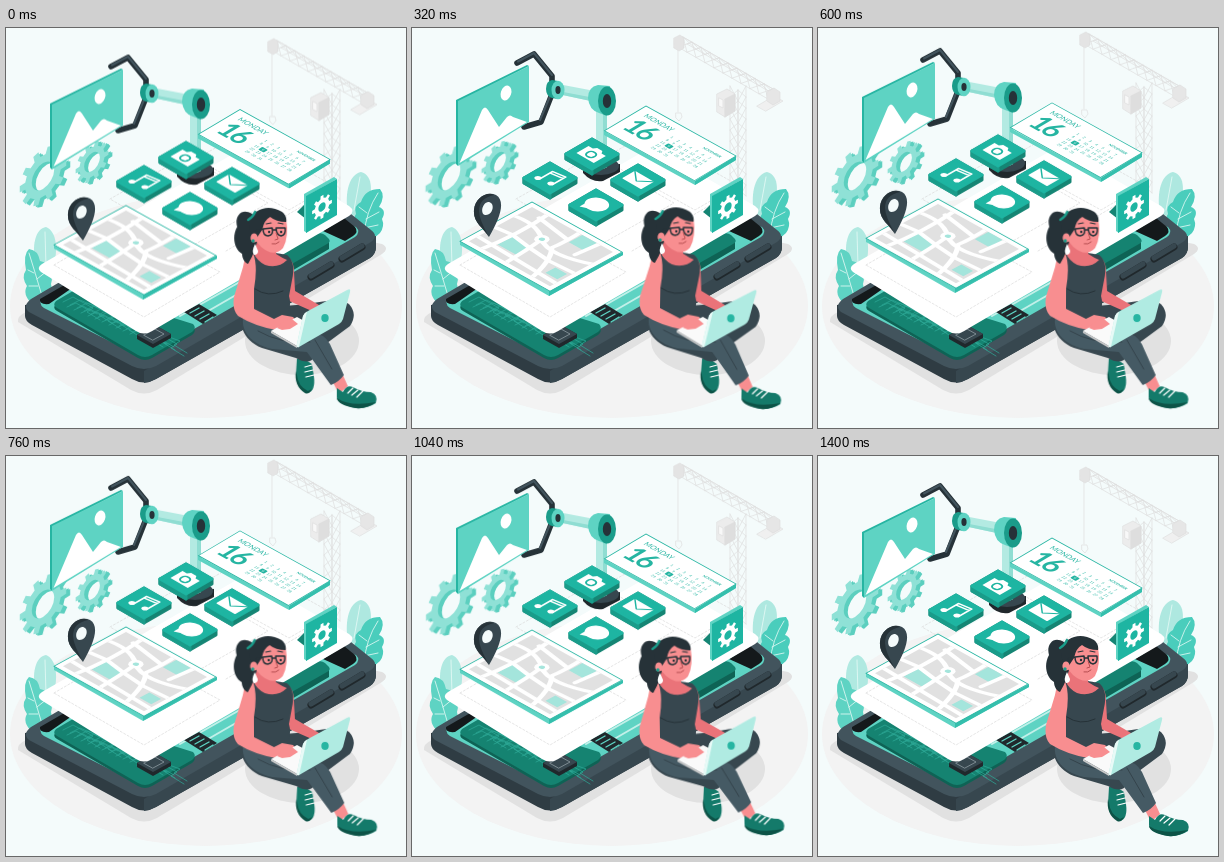
Recreate the animation shown at these times as an HTML page. Size 400 px wide and 400 px high, loop 1440 ms.

```html
<!DOCTYPE html>
<html lang="en">
<head>
<meta charset="utf-8">
<title>App builder</title>
<style>
html, body { margin: 0; width: 100%; height: 100%; overflow: hidden; background: #f4fbfb; }
svg { display: block; width: 100vw; height: 100vh; }
text { font-family: Lato, "Open Sans", sans-serif; }
.float { animation: float 1440ms -40ms linear infinite; }
.wind { animation: wind 1440ms -40ms linear infinite; }
@keyframes float { 50% { transform: translateY(-8px); } }
@keyframes wind { 25% { transform: rotate(1deg); } 75% { transform: rotate(-1deg); } }
.line { fill: none; stroke-linecap: round; stroke-linejoin: round; }
</style>
</head>
<body>
<svg viewBox="0 0 400 400" xmlns="http://www.w3.org/2000/svg">
  <ellipse cx="200" cy="278" rx="196" ry="112" fill="#f3f3f3"/>

  <g id="crane" class="float line" stroke="#dedede" stroke-width=".7"></g>
  <g id="gears"></g>

  <!-- plants -->
  <path d="M31 240C24 218 30 200 40 199C51 203 53 224 46 242Z" fill="#b0e9e1"/>
  <path d="M26 276Q16 266 21 258Q15 249 20 242Q17 226 23 221Q32 222 34 233Q42 234 41 243Q48 247 45 256L47 266Z" fill="#5ed3c3"/>
  <path d="M39 204L40 238M23 225Q29 244 36 268M22 242L28 245M23 258L32 258M41 243L31 251" class="line" stroke="#e8faf7" stroke-width=".8"/>
  <path d="M342 186C338 163 344 146 355 144C367 147 369 165 356 190Z" fill="#aee8e0"/>
  <path d="M352 208Q343 196 350 186Q347 178 355 174Q359 161 374 161Q380 168 373 179Q381 182 376 191Q379 198 374 205Q368 211 360 212Z" fill="#4acdbc"/>
  <path d="M354 149L348 182M372 165Q360 183 358 207M361 185L353 179M360 191L373 184M358 200L372 197" class="line" stroke="#e8faf7" stroke-width=".8"/>

  <!-- phone -->
  <path d="M12 294Q11 288 20 284L300 200L376 216Q384 220 376 226L151 362Q138 369 125 362Z" fill="#e1e1e1"/>
  <path d="M19 277V288Q19 293 26 297L126 351Q138 358 150 351L364 230Q370 226 370 219V208Z" fill="#2f3c43"/>
  <path d="M138 343V355Q145 354 150 351L364 230Q370 226 370 219V208Z" fill="#37474f"/>
  <path d="M23 284Q16 278 25 271L230 150L340 182L365 202Q373 208 365 214L150 338Q138 344 126 338Z" fill="#42545d"/>
  <path d="M38 280Q31 275 38 270L230 160L350 199Q355 204 349 209L146 325Q138 330 129 326Z" fill="#5ed3c3"/>
  <path d="M34 271L60 256L66 260L43 276Q33 277 34 271Z" fill="#14191b"/>
  <path d="M317 203L338 190L349 199Q353 204 347 208L339 213Z" fill="#14191b"/>
  <path d="M305 249L325 237M336 231L356 219" class="line" stroke="#20282c" stroke-width="7"/>
  <path d="M305 248L325 236M336 230L356 218" class="line" stroke="#37474f" stroke-width="5"/>
  <path d="M50 276L72 263L187 299Q191 303 186 307L146 330Q139 334 132 330L51 283Q46 280 50 276Z" fill="#0e6355"/>
  <path d="M50 273L72 260L187 296Q191 300 186 304L146 327Q139 331 132 327L51 280Q46 277 50 273Z" fill="#158371"/>
  <g id="circuits" class="line" stroke="#2fab98" stroke-width=".7"></g>
  <path d="M131 307L149 297L165 306V310L147 320L131 311Z" fill="#20282c"/>
  <path d="M131 307L149 297L165 306L147 316Z" fill="#37474f"/>
  <path d="M138 307L149 301L158 306L147 312Z" class="line" stroke="#8d9ba1" stroke-width=".8"/>
  <path d="M166 284L238 243M174 288L246 247M190 290L256 252" class="line" stroke="#c2f0e9" stroke-width="2"/>
  <path d="M178 284L193 276L211 287L197 296Z" fill="#20282c"/>
  <path d="M184 285L193 280M189 288L198 283M194 291L203 286M199 294L207 289" class="line" stroke="#5ed3c3" stroke-width="1.4"/>
  <path d="M270 232L311 208Q315 206 319 209L323 212V221L284 244L268 240Z" fill="#0e6355"/>
  <path d="M270 228L311 206Q315 204 319 207L323 211Q325 214 321 216L284 237Z" fill="#158371"/>

  <!-- interface sheet -->
  <path d="M36 236L234 122Q240 119 246 122L343 178Q350 183 343 188L146 303Q138 308 130 303L35 244Q30 240 36 236Z" fill="#fff"/>
  <g class="line" stroke="#dadada" stroke-width=".7" stroke-dasharray="2 2">
    <path d="M48 237L122 194L214 244L138 289Z"/>
    <path d="M104 171L180 128L262 175L186 218Z"/>
    <path d="M190 131L234 106L326 157L283 182Z"/>
    <path d="M220 223L300 176"/>
  </g>

  <!-- robot arm and picture -->
  <g class="float">
    <path d="M171 143V149Q180 159 191 157L208 148V140Z" fill="#20282c"/>
    <ellipse cx="189" cy="142" rx="18" ry="9" fill="#37474f"/>
    <path d="M184 82H195V143Q189 147 184 142Z" fill="#b3eae2"/>
    <path d="M191 82H195V143L191 145Z" fill="#8fddd2"/>
    <path d="M146 60L188 68V79L146 70Z" fill="#b3eae2"/>
    <path d="M146 67L188 75V79L146 70Z" fill="#8fddd2"/>
    <path d="M105 39L122 30L140 52V60M140 70L129 98L112 103" class="line" stroke="#263238" stroke-width="5.6"/>
    <path d="M106 37.5L122 29L140 51M139 70L128 96" class="line" stroke="#42545d" stroke-width="2"/>
    <path d="M140 56L146 57V75L140 74Q134 72 134 65Q134 57 140 56Z" fill="#1a9c8a"/>
    <ellipse cx="146" cy="66" rx="6.5" ry="9.3" fill="#5ed3c3"/>
    <ellipse cx="146" cy="66" rx="2.6" ry="4" fill="#263238"/>
    <path d="M186 61Q176 63 176 74Q177 86 187 89L195 92L198 62Z" fill="#5ed3c3"/>
    <ellipse cx="195" cy="77" rx="9" ry="14.5" fill="#1a9c8a"/>
    <ellipse cx="195" cy="77" rx="4.2" ry="7" fill="#263238"/>
    <path d="M44 76L115 41L117 42L46 78V142L44 140Z" fill="#26b5a2"/>
    <path d="M46 77L117 42V98L46 142Z" fill="#5ed3c3"/>
    <path d="M47.5 139L70 86Q73 81 76 86L87 103L95 93Q98 90 101 93L115 98Z" fill="#fff"/>
    <ellipse cx="94" cy="69" rx="5.2" ry="7.6" transform="rotate(18 94 69)" fill="#fff"/>
  </g>

  <g id="calendar" class="float"></g>
  <g id="tiles" class="float"></g>

  <!-- map and pin -->
  <g class="float">
    <path d="M48 217L137 267L211 228V231L137 272L48 221Z" fill="#5ed3c3"/>
    <path d="M137 267L211 228V231L137 272Z" fill="#35bfad"/>
    <g transform="matrix(.9 .5 -.9 .49 120 178)">
      <rect width="100" height="80" fill="#fff" stroke="#26b5a2" stroke-width=".9"/>
      <svg x="5" y="5" width="90" height="70" viewBox="5 5 90 70">
        <rect width="100" height="80" fill="#e1e1e1"/>
        <path d="M24 46H44V62H24ZM61 4H77V20H61ZM79 53H92V64H79Z" fill="#a4e5dc"/>
        <g class="line" stroke="#fff" stroke-width="4.2">
          <path d="M0 25Q24 18 43 32T100 27M21 0Q26 40 19 80M43 32Q46 52 47 80M57 0Q59 23 57 35Q70 48 77 80"/>
          <path d="M0 47L22 44L48 48L69 50L100 48M0 65L100 69M80 0L77 29M20 12L57 18"/>
        </g>
        <circle cx="43" cy="32" r="6" fill="#fff"/><circle cx="43" cy="32" r="2.4" fill="#a4e5dc"/>
      </svg>
    </g>
    <path fill-rule="evenodd" d="M77 213C71 203 61 199 62 186C63 174 75 167 84 171C94 177 88 194 77 213ZM76 178C70 179 68 190 73 191C81 192 84 178 76 178Z" fill="#37474f"/>
    <path d="M77 213C71 203 61 199 62 186C63 174 75 167 82 171Q67 174 67 187Q67 195 77 213Z" fill="#263238"/>
  </g>

  <!-- settings box -->
  <path d="M300 175L291 184L300 191Z" fill="#158574"/>
  <path d="M298 166L328 149L331 151L301 168V205L298 203Z" fill="#5ed3c3"/>
  <path d="M300 168L331 151V187L300 205Z" fill="#1eb5a2"/>
  <g transform="matrix(.866 -.5 0 1 316 179)"><path id="cog" fill="#fff" fill-rule="evenodd"/></g>

  <!-- woman -->
  <ellipse cx="296" cy="313" rx="57" ry="34" fill="#e1e1e1"/>
  <g class="wind" style="transform-origin:300px 280px">
    <path d="M291 331Q295 328 300 332L306 336L308 348Q310 363 302 365Q291 360 290 348Z" fill="#147a6a"/>
    <path d="M291 347Q292 358 302 363L306 361Q303 367 299 365Q288 358 290 343Z" fill="#0d5347"/>
    <path d="M299 339L306 337M299 344L307 342M300 349L308 347" class="line" stroke="#fff" stroke-width="1.2"/>
    <path d="M326 352L337 347L342 358L333 366Z" fill="#f88e90"/>
    <path d="M331 360L337 364Q341 356 347 359Q356 364 365 364Q373 367 370 375Q361 381 350 380Q331 376 331 369Z" fill="#147a6a"/>
    <path d="M331 370Q344 379 370 374Q361 381 350 380Q332 377 331 370Z" fill="#0d5347"/>
    <path d="M342 365L347 360M346 367L352 362M351 369L357 363" class="line" stroke="#fff" stroke-width="1.2"/>
    <path d="M240 281C231 294 236 312 256 320L290 330Q300 336 306 332L313 321L344 298Q352 286 343 276Q333 269 303 276Z" fill="#37474f"/>
    <path d="M240 282C231 298 242 316 266 321L301 324L325 357Q333 354 338 347L324 316Q318 305 303 304L274 294Z" fill="#455a64"/>
    <path d="M252 303Q274 316 304 314M309 312L326 341" class="line" stroke="#34434b" stroke-width="1"/>
    <path d="M278 229Q288 229 288 245L289 263L313 277Q315 283 308 284L281 272Z" fill="#ea7379"/>
    <path d="M244 225Q259 222 281 227Q290 234 286 252L283 268Q287 283 276 289Q253 292 239 282Q245 262 241 244Z" fill="#37474f"/>
    <path d="M249 261Q262 270 277 263" class="line" stroke="#263238" stroke-width="1"/>
    <path d="M250 213L270 215L270 226Q276 230 281 232Q272 241 259 237Q251 233 248 226Z" fill="#ea7379"/>
    <path d="M247 225Q238 228 237 239L228 269Q226 282 232 288Q248 298 270 302L286 301Q294 295 287 289L276 287L268 291L248 281L248 261Q252 238 247 225Z" fill="#f88e90"/>
    <path d="M246 186C235 179 228 189 231 199C225 210 229 222 236 226C236 231 239 235 242 236Q251 221 252 207Z" fill="#263238"/>
    <path d="M250 192Q264 183 280 191Q283 209 277 220Q268 230 255 219L248 211Z" fill="#f88e90"/>
    <path d="M243 193C248 181 262 176 276 184Q281 188 280 194Q270 194 264 189Q258 192 256 202L250 211Q242 205 243 193Z" fill="#263238"/>
    <path d="M242 192Q247 189 249 184" class="line" stroke="#1a9c8a" stroke-width="2.4"/>
    <ellipse cx="248" cy="210" rx="3.6" ry="4.6" fill="#f88e90"/>
    <circle cx="247" cy="213" r="1.7" fill="#1a9c8a"/>
    <path d="M249 216L252 223Q252 227 248 227Q245 224 249 216Z" fill="#fff"/>
    <g class="line" stroke="#263238" stroke-width="1.5">
      <path d="M250 203L257 201L266 200Q268 207 262 208Q257 208 257 201M270 200L279 200Q280 207 275 208Q270 207 270 200M266 202L270 202"/>
      <path d="M260 196L265 195M272 195L277 196" stroke-width="1.1"/>
      <path d="M266 216Q270 217 273 214M270 205L272 211L269 212" stroke="#b64d50" stroke-width="1"/>
    </g>
    <circle cx="263" cy="204" r="1.2" fill="#263238"/><circle cx="275" cy="204" r="1.2" fill="#263238"/>
    <path d="M265 303L291 289L313 301L291 318Z" fill="#fafafa"/>
    <path d="M265 303L291 318V320L265 305Z" fill="#c9c9c9"/>
    <path d="M271 300Q277 292 286 291L292 296L284 301L276 302Z" fill="#f88e90"/>
    <path d="M297 288Q298 285 302 283L341 262Q345 260 344 264L337 291Q336 294 333 296L293 319Q290 320 291 316Z" fill="#b0ebe2"/>
    <path d="M291 316L297 288Q298 285 301 283.5L293 319Q290 320 291 316Z" fill="#e8faf7"/>
    <ellipse cx="319" cy="290" rx="3.7" ry="4" fill="#26b5a2"/>
  </g>
</svg>
<script>
const put = (id, html) => document.getElementById(id).innerHTML = html;
const path = (d, attrs = "") => `<path d="${d}" ${attrs}/>`;
const range = n => [...Array(n).keys()];

function gear(teeth, outer, inner, hole) {
  const step = 2 * Math.PI / teeth;
  const at = (r, a) => `${(r * Math.cos(a)).toFixed(2)} ${(r * Math.sin(a)).toFixed(2)}`;
  const points = range(teeth).map(i => {
    const a = i * step;
    return [at(inner, a - step * .27), at(outer, a - step * .18),
            at(outer, a + step * .18), at(inner, a + step * .27)].join("L");
  });
  return `M${points.join("L")}ZM${hole} 0A${hole} ${hole} 0 1 0 ${-hole} 0A${hole} ${hole} 0 1 0 ${hole} 0Z`;
}

function wheel(x, y, r) {
  const d = gear(10, r, r * .77, r * .48);
  const layer = (dx, dy, fill) =>
    path(d, `transform="matrix(.866 -.5 0 1 ${x + dx} ${y + dy})" fill="${fill}" fill-rule="evenodd"`);
  return `<g class="wind" style="transform-origin:${x}px ${y}px">` +
    layer(3, 1.5, "#5ccfbf") + layer(1.5, .8, "#5ccfbf") + layer(-1, 0, "#8fe1d6") + "</g>";
}
put("gears", wheel(87, 134, 19) + wheel(38, 148, 27));
document.getElementById("cog").setAttribute("d", gear(8, 11.5, 8.5, 4.2));

// Lattice between two rails, given start, direction, rail gap and count
function truss(x, y, dx, dy, gx, gy, n) {
  let d = `M${x} ${y}l${dx * n} ${dy * n}M${x + gx} ${y + gy}l${dx * n} ${dy * n}`;
  for (let i = 0; i < n; i++) {
    const px = x + i * dx, py = y + i * dy;
    d += `M${px} ${py}L${px + gx + dx} ${py + gy + dy}M${px + gx} ${py + gy}L${px + dx} ${py + dy}`;
  }
  return path(d);
}
put("crane",
  truss(318, 62, 0, 11, 8, 4, 10) + truss(326, 66, 0, 11, 8, -4, 10) +
  truss(271, 13, 9, 5.2, -5, 10, 10) + truss(271, 13, 9, 5.2, 4, 7, 10) +
  path("M266 24V88M264 89H269L270 93L267 97L264 94Z") +
  path("M262 14L268 11L272 14V24L267 27L262 24Z", 'fill="#e4e4e4"') +
  path("M305 70L315 65L323 70V87L313 93L305 88Z", 'fill="#ececec"') +
  path("M313 75L323 70V87L313 93Z", 'fill="#dedede"') +
  path("M307 74L311 76V84L307 82Z", 'fill="#f8f8f8"') +
  path("M345 82L362 72L371 77L354 87Z", 'fill="#f0f0f0"') +
  path("M355 68L362 64L368 68V77L361 81L355 77Z", 'fill="#e6e6e6"'));

put("circuits", range(13).map(i => {
  const x = 57 + i * 7, y = 274 + i * 3;
  return path(`M${x} ${y}l10 -5l${20 + i % 3 * 5} 11l-6 4l13 8M${x + 4} ${y + 5}l9 -4l14 8`);
}).join(""));

function calendar() {
  const cells = range(31).map(i =>
    `<text x="${46.9 + i % 7 * 7.2}" y="${18.4 + Math.floor(i / 7) * 5.3}" text-anchor="middle">${i + 1}</text>`
  ).join("");
  return path("M192 107L283 157L324 132V136L283 161L192 111Z", 'fill="#5ed3c3"') +
    path("M283 157L324 132V136L283 161Z", 'fill="#35bfad"') +
    `<g transform="matrix(.866 .48 -.866 .515 234 82)" fill="#26b5a2">
      <rect width="104" height="48" fill="#fff" stroke="#26b5a2" stroke-width=".9"/>
      <text x="8.5" y="12" font-size="7.2">MONDAY</text>
      <text x="6.5" y="36" font-size="27" font-weight="700" letter-spacing="-2">16</text>
      <text x="76" y="11" font-size="3.6" font-weight="700">NOVEMBER</text>
      <rect x="50.9" y="25" width="6.4" height="5" rx="1"/>
      <g font-size="3.8">${cells}</g>
      <text x="54.1" y="29" font-size="3.8" fill="#fff" text-anchor="middle">9</text>
    </g>`;
}
put("calendar", calendar());

function tile(x, y, icon) {
  const round = c => `fill="${c}" stroke="${c}" stroke-width="3" stroke-linejoin="round"`;
  return `<g transform="translate(${x} ${y})">` +
    path("M-26 0L0 -15L26 0V5L0 20L-26 5Z", round("#158574")) +
    path("M-26 0L0 15V20L-26 5Z", round("#1a9c8a")) +
    path("M-26 0L0 -15L26 0L0 15Z", round("#1eb5a2")) +
    `<g transform="matrix(.866 .5 -.866 .5 0 0)" fill="#fff">${icon}</g></g>`;
}
const camera = '<path d="M-10 -6H-5L-3 -9H3L5 -6H10V8H-10Z"/><circle cy="1" r="5" fill="#1eb5a2"/><circle cy="1" r="3.2" fill="#fff"/>';
const note = '<path class="line" d="M-5 7V-8L8 -10V5M-5 -5L8 -7" stroke="#fff" stroke-width="1.8"/><circle cx="-7" cy="7" r="2.8"/><circle cx="6" cy="5" r="2.8"/>';
const mail = '<rect x="-11" y="-7.5" width="22" height="15" rx="1"/><path class="line" d="M-10.5 -7L0 2L10.5 -7" stroke="#1eb5a2" stroke-width="1.2"/>';
const chat = '<ellipse cy="-1" rx="10.5" ry="9.5"/><path d="M-8 3L-8 11L1 7Z"/>';
put("tiles", tile(180, 130, camera) + tile(138, 154, note) + tile(226, 156, mail) + tile(184, 181, chat));
</script>
</body>
</html>
```
